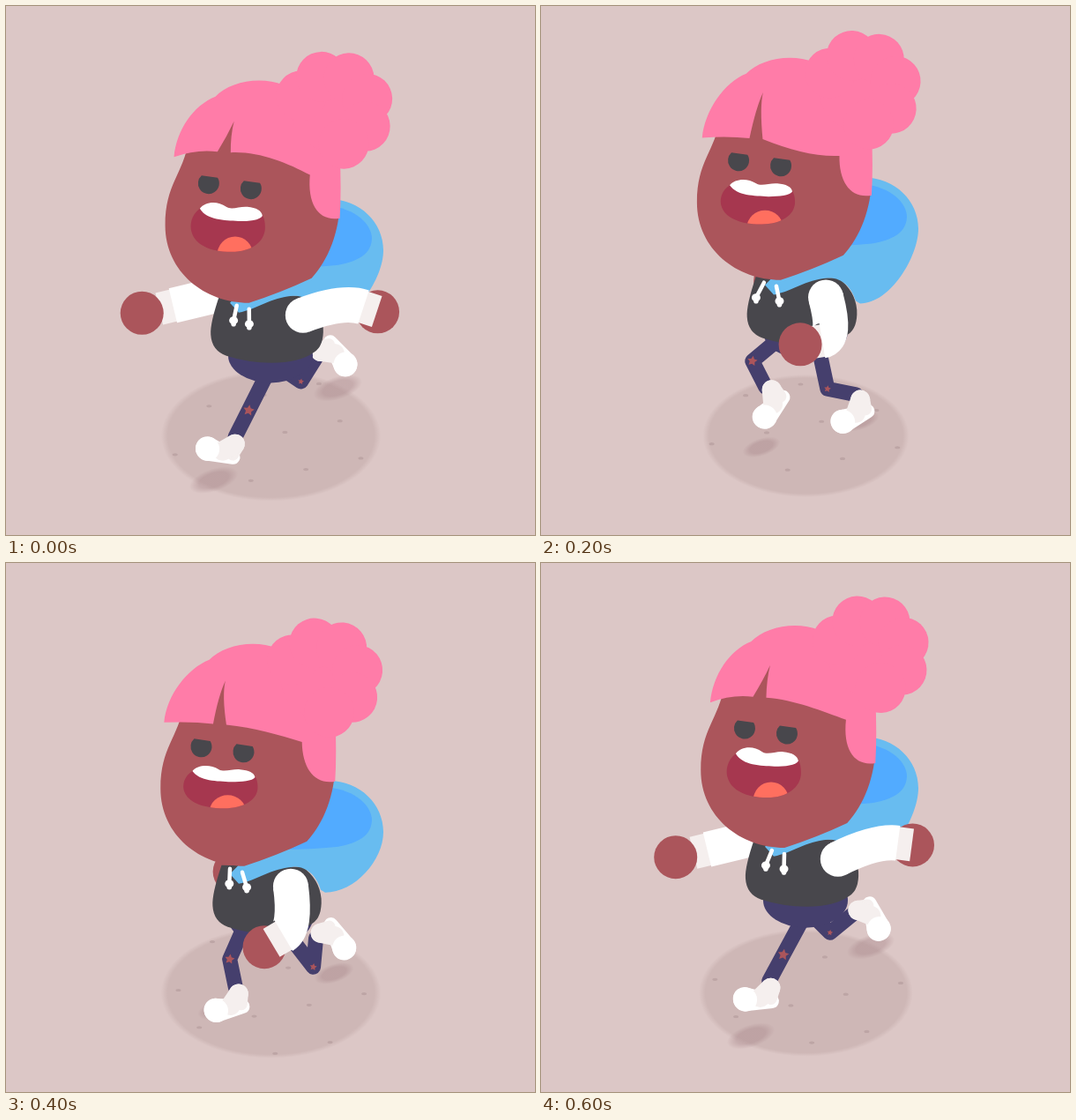
An HTML page with a canvas for the animation above (640 ms loop, 600 by 600 pixels).

```html
<!DOCTYPE html>
<html lang="en">
<head>
<meta charset="utf-8">
<title>Running girl</title>
<style>
  html, body { margin: 0; width: 100%; height: 100%; overflow: hidden; background: #dcc7c6; }
  canvas { display: block; width: 600px; height: 600px; }
</style>
</head>
<body>
<canvas id="stage" width="600" height="600"></canvas>
<script>
const ctx = document.getElementById('stage').getContext('2d');
const LOOP = 640, STEP = 40, TAU = Math.PI * 2;
const C = {
  bg: '#dcc7c6', pebble: '#bda5a5', skin: '#ab555b', hair: '#ff7ca8', dark: '#48474c',
  mouth: '#a6374f', tongue: '#ff6f5f', pants: '#453f6d', hood: '#68bcf0',
  lining: '#52abff', white: '#fff', cuff: '#f5efee'
};

// Motion: a stride takes one loop, a bounce takes half of it
const wave = (turn, peak) => Math.cos(TAU * (turn - peak));
const stride = (t, peak) => wave(t / LOOP, peak);
const bounce = (t, peak) => wave(t / LOOP * 2, peak);
const sway = t => bounce(t, .9);

// Offset of a head part: sideways sway and a bounce with its own lag
const part = (midX, ampX, midY, ampY, lag) => t =>
  [midX + ampX * sway(t), midY + ampY * bounce(t, lag)];

const head = part(-2.5, 3.8, -12, 18, .17);
const face = part(-4, 6, -12, 18, .17);
const crown = part(-1.5, 5, -12, 18, .17);
const tip = part(-7, 8, -8, 17, .19);
const notch = part(-2, 7, -16, 20, .14);
const bang = part(-1, 3.5, -3, 18.5, .24);
const corner = part(-4.5, 6.5, -6, 18, .2);
const bun = part(-2.5, 5, -5, 19, .2);

const torsoY = t => 401 + 20 * bounce(t, .22);
const pantsY = t => torsoY(t) + 17 + 7 * sway(t);
const hoodY = t => 275 + 30 * bounce(t, .24);

const mix = (a, b, k) => a + (b - a) * k;
const along = (a, b, k) => [mix(a[0], b[0], k), mix(a[1], b[1], k)];

// Middle joint of a two-part limb; straight when stretched out
function joint(a, b, upper, lower, bend) {
  const dx = b[0] - a[0], dy = b[1] - a[1], d = Math.hypot(dx, dy);
  if (d >= upper + lower) return along(a, b, upper / (upper + lower));
  const run = (d * d + upper * upper - lower * lower) / (2 * d);
  const rise = bend * Math.sqrt(Math.max(0, upper * upper - run * run));
  return [a[0] + (dx * run - dy * rise) / d, a[1] + (dy * run + dx * rise) / d];
}

const fill = (color, d) => { ctx.fillStyle = color; ctx.fill(d); };
const path = d => new Path2D(d);

function ellipse(color, x, y, rx, ry = rx) {
  ctx.fillStyle = color;
  ctx.beginPath();
  ctx.ellipse(x, y, rx, ry, 0, 0, TAU);
  ctx.fill();
}

function line(color, width, cap, pts) {
  ctx.strokeStyle = color;
  ctx.lineWidth = width;
  ctx.lineCap = cap;
  ctx.lineJoin = 'round';
  ctx.beginPath();
  for (const p of pts) ctx.lineTo(...p);
  ctx.stroke();
}

// Two circles and the area between their outer tangents
function capsule(color, x1, y1, r1, x2, y2, r2) {
  const a = Math.atan2(y2 - y1, x2 - x1);
  const b = Math.acos((r1 - r2) / Math.hypot(x2 - x1, y2 - y1));
  ctx.fillStyle = color;
  ctx.beginPath();
  ctx.arc(x1, y1, r1, a + b, a - b + TAU);
  ctx.arc(x2, y2, r2, a - b, a + b);
  ctx.fill();
}

function softEllipse(x, y, rx, ry, turn, rgb, alpha, core) {
  ctx.save();
  ctx.translate(x, y);
  ctx.rotate(turn);
  ctx.scale(rx, ry);
  const g = ctx.createRadialGradient(0, 0, core, 0, 0, 1);
  g.addColorStop(0, `rgba(${rgb},${alpha})`);
  g.addColorStop(1, `rgba(${rgb},0)`);
  ellipse(g, 0, 0, 1);
  ctx.restore();
}

function drawGround(t) {
  const x = 300.5, y = 487.5, r = 121.5 + 4.5 * bounce(t, .13), ry = r * .595;
  softEllipse(x, y, r, ry, 0, '206,183,182', 1, .94);
  ctx.save();
  ctx.beginPath();
  ctx.ellipse(x, y, r * .97, ry * .97, 0, 0, TAU);
  ctx.clip();
  const count = 18;
  for (let i = 0; i < count; i++) {
    const way = (i * .618 + t / LOOP * 2) % 1;
    const lane = -100 + 200 * (i + .5) / count;
    ellipse(C.pebble, 168 + 264 * way, 561 - 148 * way + lane, 3, 1.6);
  }
  ctx.restore();
}

function drawFootShade(t) {
  const s = stride(t, .48), x = 85 * s;
  softEllipse(320 + x, 493 - x * .53, 20 + 9 * s * s, 9 + 4 * s * s, -.32, '168,134,138', .42, .6);
}

function drawStar(x, y, r) {
  ctx.fillStyle = C.skin;
  ctx.beginPath();
  for (let i = 0; i < 10; i++) {
    const a = i * TAU / 10 - 1.4, q = i % 2 ? r * .5 : r;
    ctx.lineTo(x + q * Math.cos(a), y + q * Math.sin(a));
  }
  ctx.fill();
}

// Ankle at the origin, toe along the x axis
function drawShoe(x, y, angle) {
  ctx.save();
  ctx.translate(x, y);
  ctx.rotate(angle);
  capsule(C.white, 34, 0, 13.5, 11, -20, 8);
  capsule(C.cuff, 3, -7, 11, 10, -17, 7);
  capsule(C.cuff, 3, -7, 11, 19, -9, 11);
  ellipse(C.white, 34, 0, 13.5, 14);
  ctx.restore();
}

function drawLeg(t) {
  const reach = stride(t, .46);
  const hip = [310 - 12 * stride(t, 0), pantsY(t) - 14];
  const ankle = [320 + 62 * reach, 451 + 40 * stride(t, .05) + 10 * bounce(t, .25)];
  const knee = joint(hip, ankle, 49, 33, 1);
  line(C.pants, 17, 'round', [hip, knee, ankle]);
  drawStar(...knee, 5 - 1.6 * reach);
  // The foot swings freely and turns flat while planted
  const planted = Math.sqrt(Math.max(0, Math.cos(1.5 * TAU * (t % LOOP / LOOP - .22))) * (t % LOOP < LOOP / 2));
  const degrees = mix(86 + 75 * stride(t, .05), 125, planted);
  drawShoe(...ankle, degrees * TAU / 360);
}

function drawLegs(t) {
  const passes = [drawFootShade, drawLeg];
  for (const draw of passes) {
    ctx.save();
    ctx.translate(-28, -15);
    draw(t + LOOP / 2);
    ctx.restore();
    draw(t);
  }
}

function drawArm(shoulder, elbow, hand, wrist, handOnTop) {
  const end = along(elbow, hand, wrist);
  const len = Math.hypot(hand[0] - elbow[0], hand[1] - elbow[1]);
  const palm = () => ellipse(C.skin, ...hand, 24.5);
  if (!handOnTop) palm();
  line(C.cuff, 37, 'butt', [along(elbow, hand, wrist - 1 / len), along(elbow, hand, wrist + 16 / len)]);
  ellipse(C.white, ...shoulder, 20);
  ctx.strokeStyle = C.white;
  ctx.lineWidth = 40;
  ctx.lineCap = 'butt';
  ctx.beginPath();
  ctx.moveTo(...shoulder);
  ctx.quadraticCurveTo(...elbow, ...end);
  ctx.stroke();
  if (handOnTop) palm();
}

function drawNearArm(t) {
  const s = stride(t, .97), turn = t / LOOP;
  const swing = s * (1.35 - .35 * s * s);
  const shoulder = [328 + 9 * s, torsoY(t) - 54];
  const hand = [346 + 76 * swing, torsoY(t) - 18 + 42 * stride(t, .45) + 14 * bounce(t, .25)];
  drawArm(shoulder, joint(shoulder, hand, 48, 42, -1), hand, .47 + .13 * s, turn > .2 && turn < .6);
}

function drawFarArm(t) {
  const s = stride(t, .46);
  const shoulder = [258 + 15 * s, torsoY(t) - 78];
  const hand = [223 + 71 * s, torsoY(t) - 66 + 10 * stride(t, .95)];
  drawArm(shoulder, along(shoulder, hand, .4), hand, .47 + .13 * s, true);
}

function drawBody(t) {
  const b = torsoY(t), h = hoodY(t);
  ellipse(C.pants, 300, pantsY(t) - 31, 48, 31);
  ctx.save();
  ctx.translate(296, b);
  ctx.scale(1.025 + .025 * sway(t), 1);
  fill(C.dark, path('M-51-78Q-62-45-61-32Q-60-14-44-8Q-20 0 5 0Q35 0 51-12Q62-19 61-40Q59-62 40-76Z'));
  ctx.restore();
  fill(C.hood, path(`M366 ${h - 58}C402 ${h - 58} 428 ${h - 31} 428 ${h}C428 ${h + 32} 396 ${b - 47} 362 ${b - 47}
    L357 ${b - 50}C352 ${b - 66} 341 ${b - 77} 325 ${b - 76}C300 ${b - 74} 285 ${b - 61} 264 ${b - 57}
    L254 ${b - 68}L300 ${b - 115}Z`));
  fill(C.lining, path(`M364 ${h - 51}C398 ${h - 47} 415 ${h - 29} 415 ${h - 13}C414 ${h + 8} 392 ${h + 14} 375 ${h + 17}
    C355 ${h + 19} 335 ${h + 20} 315 ${h + 20}L320 ${h - 30}Z`));
  drawStrings(t);
}

function drawStrings(t) {
  const x = 256.5 + 5.5 * stride(t, .95), y = 343 + head(t)[1];
  const swings = [-5 + 4.5 * bounce(t, .2), 3 - 3.5 * sway(t)];
  swings.forEach((dx, i) => {
    const top = [x + 14 * i, y + 4 * i], end = [top[0] + dx, top[1] + 17];
    line(C.white, 4.5, 'round', [top, end]);
    ellipse(C.white, ...end, 5, 4.5);
    ellipse(C.white, end[0], end[1] + 4, 2.8);
  });
}

function drawFace(t) {
  ctx.save();
  ctx.translate(...face(t));
  ctx.fillStyle = C.dark;
  for (const [x, y] of [[229, 204.5], [277, 210.5]]) {
    ctx.beginPath();
    ctx.arc(x, y, 12, -.56, 3.98);
    ctx.fill();
  }
  ctx.translate(251, 226);
  ctx.scale(1, .94 + .1 * sway(t));
  const lips = path('M-32 7C-42 14-44 26-41 34C-37 46-22 55 4 55C26 55 42 44 42 28C42 22 41 17 39 14Z');
  fill(C.mouth, lips);
  ctx.save();
  ctx.clip(lips);
  ellipse(C.tongue, 8, 59, 20.5, 21);
  ctx.restore();
  fill(C.white, path('M-32 7C-26-1-12-2-2 5C4 9 14 4 22 5C32 6 38 9 39 15C36 20 24 21 12 21C-4 20-24 20-32 7Z'));
  ctx.restore();
}

function drawBun(t) {
  ctx.save();
  ctx.translate(...bun(t));
  // Tilts around its top
  ctx.translate(369, 70);
  ctx.rotate(.04 - .08 * sway(t));
  ctx.translate(0, 47);
  ellipse(C.hair, 0, 0, 48);
  for (let i = 0; i < 6; i++) {
    const a = (205 + 46 * i) * TAU / 360;
    ellipse(C.hair, 40 * Math.cos(a), 40 * Math.sin(a), 28.5);
  }
  ctx.restore();
}

function drawHair(t) {
  const at = ([dx, dy], sag = 0) => (x, y) => `${x + dx} ${y + dy + sag} `;
  const sag = 6 + 8 * bounce(t, .55);
  const p = at(tip(t)), c = at(crown(t)), n = at(notch(t)), g = at(bang(t));
  const k = at(corner(t)), s = at(head(t)), q = at(bun(t));
  const k2 = at(corner(t), sag), g2 = at(bang(t), sag);
  fill(C.hair, path(
    'M' + p(191, 173) + 'C' + p(194, 142) + c(210, 116) + c(235, 106) +
    'C' + c(250, 90) + c(285, 82) + c(312, 93) +
    'L' + q(350, 130) + 'L' + s(378, 170) + 'Q' + s(380, 212) + s(378, 244) +
    'C' + s(355, 248) + s(341, 230) + k(344, 192) +
    'C' + k2(318, 180) + g2(285, 168) + g(253, 168) +
    'Q' + n(251, 150) + n(255, 134) + 'Q' + n(247, 151) + g(238, 167) +
    'Q' + g(214, 164) + p(191, 173) + 'Z'));
  drawBun(t);
}

function drawHead(t) {
  ctx.save();
  ctx.translate(...head(t));
  fill(C.skin, path(`M207 155C200 195 180 205 180 252C180 305 225 340 275 340Q312 328 346 312
    C365 292 378 258 378 225L374 170L300 105L245 115Z`));
  ctx.restore();
  drawFace(t);
  drawHair(t);
}

function draw(t) {
  ctx.fillStyle = C.bg;
  ctx.fillRect(0, 0, 600, 600);
  drawGround(t);
  drawFarArm(t);
  drawLegs(t);
  drawBody(t);
  drawHead(t);
  drawNearArm(t);
}

const start = performance.now();
function tick() {
  const t = (performance.now() - start) % LOOP;
  draw(Math.floor(t / STEP) * STEP);
  requestAnimationFrame(tick);
}
tick();
</script>
</body>
</html>
```
